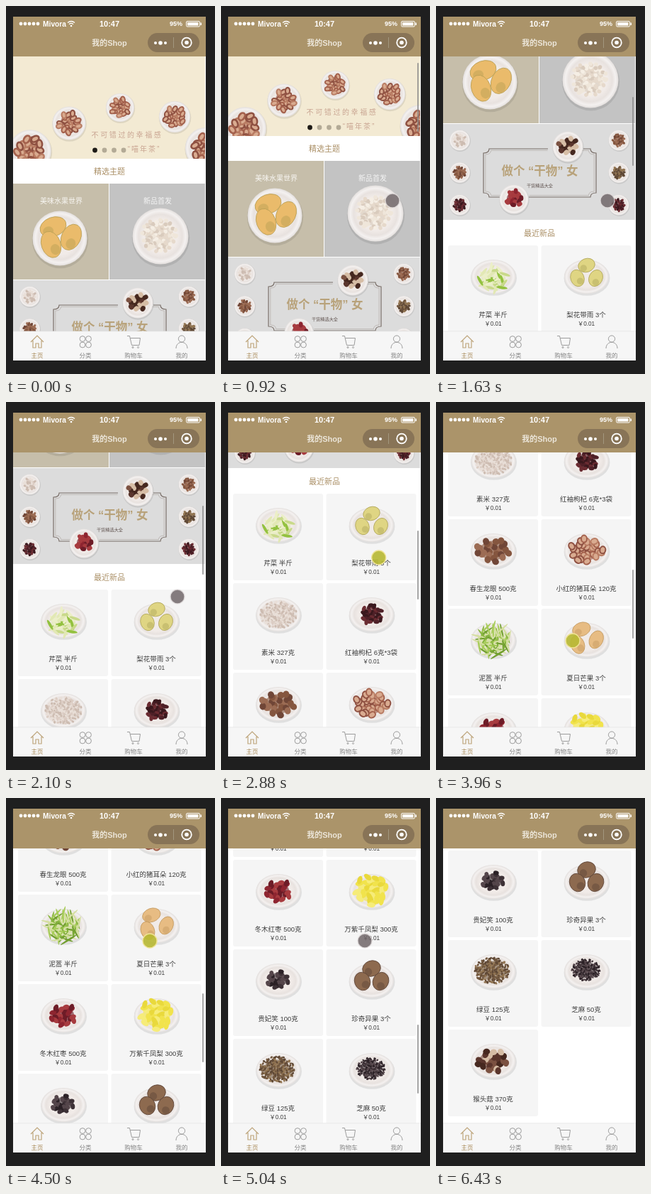
Animation, 295 px wide and 518 px high, one loop 7510 ms. Source, as an HTML page:

```html
<!DOCTYPE html>
<html lang="zh-CN">
<head>
<meta charset="utf-8">
<title>我的Shop</title>
<style>
html, body { margin: 0; width: 100%; height: 100%; overflow: hidden; background: #1f1f1f; }
svg { display: block; width: 100vw; height: 100vh; }
text { font-family: "Liberation Sans", "Noto Sans CJK SC", "Noto Sans CJK", sans-serif; dominant-baseline: central; }
</style>
</head>
<body>
<svg viewBox="0 0 295 518">
  <defs>
    <clipPath id="view"><rect x="10" y="71" width="272" height="387"/></clipPath>
    <clipPath id="hero"><rect x="10" y="71" width="271" height="144"/></clipPath>
    <radialGradient id="dish">
      <stop offset=".6" stop-color="#f1ebe8"/><stop offset=".78" stop-color="#e8e2df"/>
      <stop offset=".9" stop-color="#f4f1f0"/><stop offset="1" stop-color="#e3dfdd"/>
    </radialGradient>
  </defs>
  <rect width="295" height="518" fill="#1f1f1f"/>
  <rect x="10" y="15" width="272" height="484" fill="#fff"/>
  <g clip-path="url(#view)"><g id="page"></g></g>
  <rect id="bar" x="277" width="2" height="97" rx="1" fill="#888" opacity=".75"/>
  <g id="chrome"></g>
  <circle id="touch" r="10" stroke-width="1.4"/>
</svg>
<script>
const LOOP = 7510;
const el = id => document.getElementById(id);

let seed = 1;
const rnd = () => (seed = (seed * 16807) % 2147483647) / 2147483647;

const rect = (x, y, w, h, fill, r = 0) =>
  `<rect x="${x}" y="${y}" width="${w}" height="${h}" rx="${r}" fill="${fill}"/>`;
const oval = (x, y, rx, ry, fill, extra = '') =>
  `<ellipse cx="${x}" cy="${y}" rx="${rx}" ry="${ry}" fill="${fill}" ${extra}/>`;
const line = (d, color, width = 1) =>
  `<path d="${d}" fill="none" stroke="${color}" stroke-width="${width}"/>`;
const label = (s, x, y, size, fill, extra = '') =>
  `<text x="${x}" y="${y}" font-size="${size}" fill="${fill}" text-anchor="middle" ${extra}>${s}</text>`;

const plate = (x, y, rx, ry = rx) =>
  oval(x + .5, y + rx * .06, rx * 1.03, ry * 1.04, '#000', 'opacity=".09"') + oval(x, y, rx, ry, 'url(#dish)');

// Fills an oval with pieces of size w by h, spread along a sunflower spiral.
function heap(x, y, rx, ry, w, h, colors, ring = 0) {
  const n = Math.round(1.15 * rx * ry / (w * h));
  let out = oval(x, y, rx * .72, ry * .72, colors[0], 'opacity=".6"');
  for (let i = 0; i < n; i++) {
    const a = i * 2.4 + rnd() * .5, d = Math.sqrt((i + rnd()) / n);
    const px = (x + Math.cos(a) * d * (rx - w * .6)).toFixed(1);
    const py = (y + Math.sin(a) * d * (ry - h * .6)).toFixed(1);
    const color = colors[Math.floor(rnd() * colors.length)];
    const turn = `transform="rotate(${Math.floor(rnd() * 180)} ${px} ${py})"`;
    out += ring
      ? oval(px, py, w, h, '#d9ab90', `stroke="${color}" stroke-width="${ring}" ${turn}`)
      : oval(px, py, w, h, color, turn);
  }
  return out;
}

// Three large pieces around a point.
function trio(x, y, reach, start, rx, ry, fill, edge) {
  let out = '';
  for (let i = 0; i < 3; i++) {
    const a = start + i * 2.094;
    const px = x + Math.cos(a) * reach, py = y + Math.sin(a) * reach * .8;
    const turn = `transform="rotate(${-20 - 45 * i} ${px} ${py})"`;
    out += oval(px, py, rx, ry, fill, `stroke="${edge}" stroke-width=".8" ${turn}`) +
      oval(px - rx * .45, py + ry * .25, rx * .4, ry * .5, edge, `opacity=".45" ${turn}`);
  }
  return out;
}

const RED = ['#6d1c27', '#8e2530', '#a73b3f'];
const CURL = ['#a3604c', '#8f5142', '#b87b62'];
const SHROOM = ['#7b5141', '#5a352c', '#d6bda5', '#46281f'];
const NUT = ['#85563f', '#9c6c54', '#704637'];
const WINE = ['#4f2027', '#6a2b31', '#3a181d'];
const PALE = ['#dccdc4', '#cdbcb1', '#e9dfd8'];
const BROWN = ['#735940', '#5f4835', '#927552'];
const INK = ['#3d3136', '#2b2126', '#54454a'];

const foods = {
  celery: (x, y) => heap(x, y + 3, 24, 18, 8, 2, ['#e2e8b4', '#ecefc8', '#c9d98a', '#93c13f']),
  pear: (x, y) => trio(x, y - 4, 15, -1.57, 12, 9.5, '#dfd583', '#b0a65a'),
  rice: (x, y) => heap(x, y, 27, 20, 2, 1.5, PALE),
  goji: (x, y) => heap(x, y, 18, 15, 4, 2.6, WINE),
  longan: (x, y) => heap(x, y, 27, 19, 5, 4.5, NUT),
  ears: (x, y) => heap(x, y, 27, 19, 5, 4, CURL, 2),
  shoots: (x, y) => heap(x, y + 1, 29, 22, 10, 1.2, ['#d5dfa1', '#86b53d', '#a7cc59', '#729f31']),
  mango: (x, y) => trio(x - 2, y - 3, 16, -1.9, 13, 9.5, '#e7bc83', '#c49a5f'),
  jujube: (x, y) => heap(x, y, 21, 17, 5, 3.4, RED),
  pineapple: (x, y) => heap(x, y - 1, 27, 23, 6, 3.5, ['#f1e34c', '#e9d93c', '#f6ec79']),
  raisin: (x, y) => heap(x - 1, y - 1, 18, 14, 4, 3, INK),
  kiwi: (x, y) => trio(x, y - 5, 15, -1.57, 13, 11, '#8d6a4f', '#5d4438'),
  mung: (x, y) => heap(x - 2, y - 1, 26, 19, 2, 1.4, BROWN),
  sesame: (x, y) => heap(x - 1, y - 2, 21, 16, 1.6, 1.2, INK),
  mushroom: (x, y) => heap(x - 2, y, 25, 18, 5, 4.2, SHROOM)
};

const products = [
  ['芹菜 半斤', 'celery'], ['梨花带雨 3个', 'pear'],
  ['素米 327克', 'rice'], ['红袖枸杞 6克*3袋', 'goji'],
  ['春生龙眼 500克', 'longan'], ['小红的猪耳朵 120克', 'ears'],
  ['泥蒿 半斤', 'shoots'], ['夏日芒果 3个', 'mango'],
  ['冬木红枣 500克', 'jujube'], ['万紫千凤梨 300克', 'pineapple'],
  ['贵妃笑 100克', 'raisin'], ['珍奇异果 3个', 'kiwi'],
  ['绿豆 125克', 'mung'], ['芝麻 50克', 'sesame'],
  ['猴头菇 370克', 'mushroom']
];

function banner() {
  let out = rect(10, 71, 271, 144, '#f3ead3');
  for (const [x, y] of [[34, 204], [89, 165], [161, 143], [238, 156], [282, 200]]) {
    const r = 20 + (y - 143) * .16;
    out += plate(x, y, r) + heap(x, y, r * .74, r * .7, r * .19, r * .13, CURL, r * .09);
  }
  out += label('不可错过的幸福感', 171, 181, 10, '#c9a592', 'letter-spacing="2.6"') +
    label('“喵年茶”', 195, 201, 10, '#c9a592', 'letter-spacing="2"');
  for (let i = 0; i < 4; i++) out += oval(125.5 + 13.5 * i, 203, 3.4, 3.4, i ? '#b3aa96' : '#1d1a16');
  return `<g clip-path="url(#hero)">${out}</g>`;
}

function tiles() {
  return rect(10, 250, 135, 135, '#c6beaa') + rect(146, 250, 135, 135, '#c3c3c3') +
    label('美味水果世界', 78, 274, 10, '#f8f6f2') + label('新品首发', 214, 274, 10, '#f4f4f4') +
    plate(76, 327, 38.5) + trio(74, 324, 18, -2, 19, 13.5, '#eabb6b', '#b9a055') +
    plate(218, 324, 39.5) + heap(216, 323, 27, 25, 3, 2.7, ['#d9cbbd', '#efe6da', '#f5eee4', '#e6d9cb']);
}

function dryGoods() {
  const frame = 'M158 421H75Q75 427 67 427V483Q75 483 75 489H90M131 489H218Q218 483 226 483V427Q218 427 218 421H208';
  let out = rect(10, 386, 271, 135, '#dcdcdc') + line(frame, '#7b706a', 1.2) +
    `<g transform="translate(146.5 455) scale(.965 .93) translate(-146.5 -455)">${line(frame, '#a8a09b', .6)}</g>`;
  out += label('做个 “干物” 女', 146.5, 452, 16.5, '#b8a27a', 'font-weight="900"') +
    label('干货精选大全', 146.5, 472, 6.2, '#5d504c');
  [PALE, NUT, NUT, BROWN, WINE, WINE].forEach((colors, i) => {
    const x = i % 2 ? 258 : 33.5, y = 409 + 45.5 * (i >> 1);
    out += plate(x, y, 14.5) + heap(x, y, 10, 9.5, 2, 1.6, colors);
  });
  return out + plate(186, 418, 21.5) + heap(186, 417, 16, 14, 4, 3.4, SHROOM) +
    plate(110, 492, 20.5) + heap(110, 491, 14, 13, 4, 3, RED);
}

function productCards() {
  return products.map(([name, food], i) => {
    const right = i % 2, top = 557 + 126 * (i >> 1);
    const x = right ? 212.5 : 81, mid = right ? 212 : 80.5;
    return rect(right ? 148.5 : 17, top, 127, 122, '#f5f5f5', 3) +
      plate(x, top + 44, 31.5, 24) + foods[food](x, top + 44) +
      label(name, mid, top + 97, 9.5, '#3c3c3c') + label('￥0.01', mid, top + 110, 8.2, '#3c3c3c');
  }).join('');
}

function topBar() {
  const bold = 'font-weight="bold"', white = '#fff';
  let out = rect(10, 15, 272, 56, '#ab946a');
  for (let i = 0; i < 5; i++) out += oval(21 + i * 6, 25, 2.4, 2.4, white);
  out += label('Mivora', 68.5, 25, 10.2, white, bold) +
    line('M87 23.5Q92 19.5 97 23.5M89 25.7Q92 23.2 95 25.7', white, 1.3) + oval(92, 28, 1.3, 1.3, white) +
    label('10:47', 146, 24.5, 11, white, bold) + label('95%', 240, 25, 9, white, bold) +
    '<rect x="254.5" y="21.5" width="19" height="7.5" rx="1.5" fill="none" stroke="#fff"/>' +
    rect(256, 23, 15.5, 4.5, white) + rect(274.5, 23.5, 1.5, 3.5, white) +
    label('我的Shop', 146, 51.5, 11, '#ece6da', bold);
  out += rect(200, 38, 73, 27, '#887457', 13.5) + rect(236, 44, 1, 15, '#a3977f');
  for (let i = -1; i < 2; i++) out += oval(218 + 7 * i, 52, i ? 2 : 2.8, i ? 2 : 2.8, white);
  return out + oval(255, 51.5, 6.8, 6.8, 'none', 'stroke="#fff" stroke-width="1.8"') + oval(255, 51.5, 2.8, 2.8, white);
}

function tabBar() {
  const gold = '#bda47a', gray = '#9c9c9c';
  const ring = (x, y, r) => oval(x, y, r, r, 'none', `stroke="${gray}"`);
  let out = rect(10, 458, 272, 41, '#f6f6f6') + rect(10, 457.5, 272, .7, '#e2e2e2');
  out += line('M35 473L44 464L53 473M38 471V481H42V475H46V481H50V471', gold, 1.2);
  for (const x of [108, 116.5]) for (const y of [468.5, 477]) out += ring(x, y, 3.9);
  out += line('M171 464.5H174.5L177.5 477.5H188L189.5 467.5H175.5', gray) + ring(179, 480.5, 1) + ring(186.5, 480.5, 1);
  out += ring(248, 468.5, 4.6) + line('M240 482C240 470.5 256 470.5 256 482', gray);
  ['主页', '分类', '购物车', '我的'].forEach((s, i) =>
    out += label(s, 44 + 68 * i, 492, 8.5, i ? '#858585' : '#a98a58'));
  return out;
}

el('page').innerHTML = banner() + label('精选主题', 146, 233, 11, '#ab9067') + tiles() + dryGoods() +
  label('最近新品', 146, 540, 11, '#ab9067') + productCards();
el('chrome').innerHTML = topBar() + tabBar();

// The picture refreshes about every 78 ms within these spans and rests between them.
const spans = [[70, 370], [920, 1070], [1390, 1710], [1860, 2100], [2410, 6430]];
function refreshTime(clock) {
  const span = spans.filter(([a]) => a <= clock).pop();
  if (!span) return 0;
  const [a, b] = span, step = (b - a) / Math.round((b - a) / 78);
  return a + step * Math.floor((Math.min(clock, b) - a) / step + 1e-6);
}

const easeOut = p => 1 - (1 - Math.min(1, Math.max(0, p))) ** 2;
const ramp = (t, start, duration) => easeOut((t - start) / duration);
const sum = (list, f) => list.reduce((total, item) => total + f(item), 0);

// Four wheel notches, then three swipes: each a drag followed by a glide.
const SCROLL_END = 1113, DRAG = 400, RELEASE = 490;
const notches = [870, 1350, 1440, 1820];
const swipes = [{ at: 2620, x: 214 }, { at: 4020, x: 193 }, { at: 5250, x: 212 }];
const scrollAt = t => Math.min(SCROLL_END,
  sum(notches, at => 73.3 * ramp(t, at, 200)) +
  sum(swipes, ({ at }) => 155 * ramp(t, at, DRAG) + 196 * ramp(t, at + RELEASE, 790)));

const pressedAt = t => swipes.some(({ at }) => t >= at - 70 && t < at + RELEASE);
const touchPath = [
  [70, 267, 508], [370, 242, 274], [2410, 242, 274],
  ...swipes.flatMap(({ at, x }) => [[at - 70, x, 336], [at, x, 336], [at + DRAG, x + 10, 201], [at + 1020, x + 10, 201]]),
  [6430, 238, 508]
];
function touchAt(t) {
  const i = touchPath.findIndex(([time]) => time > t);
  const [t0, x0, y0] = touchPath[i - 1], [t1, x1, y1] = touchPath[i];
  const p = ramp(t, t0, t1 - t0);
  return [x0 + (x1 - x0) * p, y0 + (y1 - y0) * p];
}

function draw(now) {
  const t = refreshTime(now % LOOP);
  const scroll = Math.round(scrollAt(t));
  el('page').setAttribute('transform', `translate(0 ${-scroll})`);
  el('bar').setAttribute('y', Math.round(72 + scroll * .254));
  el('bar').style.display = t >= 920 && t < 6270 ? '' : 'none';

  const touch = el('touch'), shown = t >= 70 && t < 6429;
  touch.style.display = shown ? '' : 'none';
  if (!shown) return;
  const [x, y] = touchAt(t), pressed = pressedAt(t);
  touch.setAttribute('cx', x);
  touch.setAttribute('cy', y);
  touch.setAttribute('fill', pressed ? 'rgba(183,184,50,.9)' : 'rgba(112,102,104,.85)');
  touch.setAttribute('stroke', pressed ? '#efe394' : 'rgba(225,220,220,.8)');
}

const start = performance.now();
function loop() {
  draw(performance.now() - start);
  requestAnimationFrame(loop);
}
loop();
</script>
</body>
</html>
```
